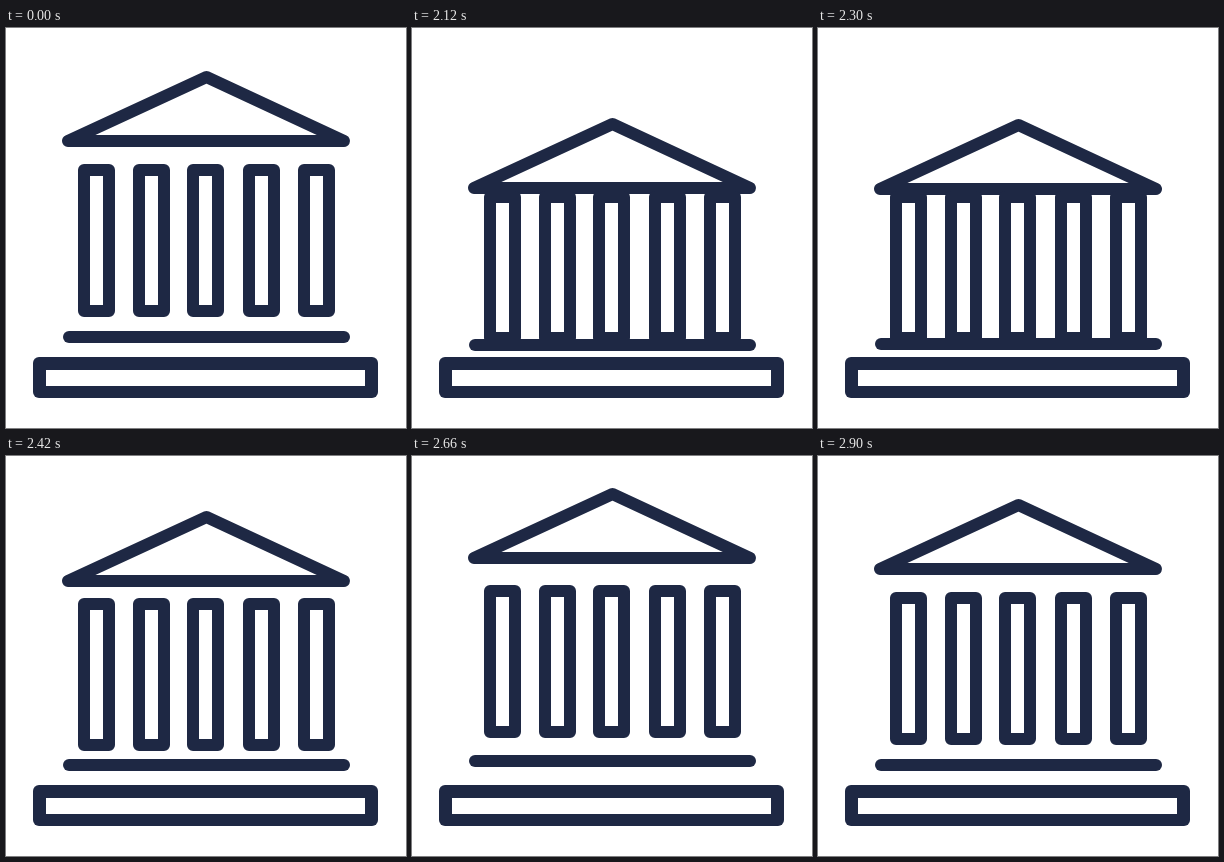
An HTML page that plays this animation: 400x400 px, repeating every 2930 ms.

```html
<!DOCTYPE html>
<html lang="en">
<head>
<meta charset="utf-8">
<title>Bank icon</title>
<style>
  html, body { margin: 0; width: 100%; height: 100%; overflow: hidden; background: #fff; }
  svg { display: block; width: 100%; height: 100%; }
</style>
</head>
<body>
<svg viewBox="0 0 400 400" fill="none" stroke="#1e2844" stroke-width="12" stroke-linejoin="round" stroke-linecap="round">
  <path id="roof" d="M62 113 L200.5 49 L338 113 Z"/>
  <path id="columns"/>
  <path id="step" d="M63 309 H338"/>
  <g stroke="none">
    <rect x="27" y="329" width="345" height="41" rx="6" fill="#1e2844"/>
    <rect x="40" y="342" width="319" height="16" fill="#fff"/>
  </g>
</svg>
<script>
  const LOOP = 2930, START = 2030, STEP = 30;
  const EASE_FROM = 1962, LOWEST = 2196, HIGHEST = 2570, SETTLED = 2900;
  const byId = id => document.getElementById(id);

  byId('columns').setAttribute('d',
    [78, 133, 187, 243, 298].map(x => `M${x} 142 h25 v141 h-25 Z`).join(' '));

  // How far each part drops, then rebounds above its resting place.
  const parts = [
    { node: byId('roof'), drop: 61.5, rebound: -13.6 },
    { node: byId('columns'), drop: 35, rebound: -9 },
    { node: byId('step'), drop: 10, rebound: -5 }
  ];

  function ease(t, t0, t1, from, to) {
    const u = Math.min(1, (t - t0) / (t1 - t0));
    return from + (to - from) * (1 - Math.cos(Math.PI * u)) / 2;
  }

  function offset({ drop, rebound }, t) {
    if (t < START) return 0;
    if (t < LOWEST) return ease(t, EASE_FROM, LOWEST, 0, drop);
    if (t < HIGHEST) return ease(t, LOWEST, HIGHEST, drop, rebound);
    return ease(t, HIGHEST, SETTLED, rebound, 0);
  }

  function render(ms) {
    const t = ms % LOOP;
    const held = START + Math.floor((t - START) / STEP) * STEP;
    for (const part of parts) {
      part.node.setAttribute('transform', `translate(0 ${Math.round(offset(part, held))})`);
    }
  }

  let origin;
  function tick(now) {
    origin ??= now;
    render(now - origin);
    requestAnimationFrame(tick);
  }
  render(0);
  requestAnimationFrame(tick);
</script>
</body>
</html>
```
